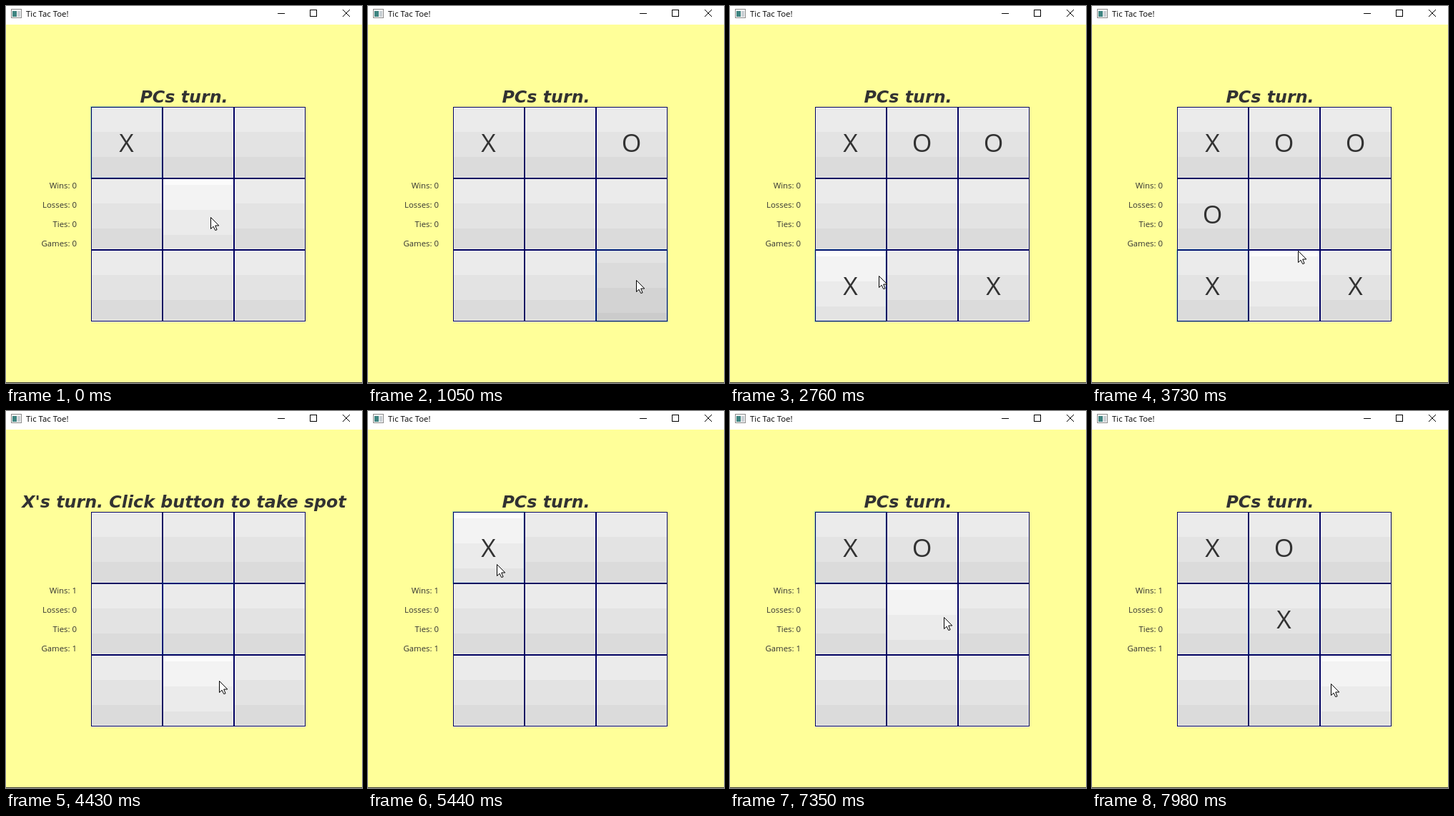
An HTML page with a canvas that plays this animation: 498 px wide and 527 px high, repeating every 8000 ms.

```html
<!DOCTYPE html>
<html lang="en">
<head>
<meta charset="utf-8">
<title>Tic Tac Toe!</title>
<style>
html, body { margin: 0; width: 498px; height: 527px; overflow: hidden; background: #ffff99; }
canvas { display: block; }
</style>
</head>
<body>
<canvas id="stage" width="498" height="527"></canvas>
<script>
const ctx = document.getElementById('stage').getContext('2d');
const LOOP = 8000, STEP = 130;
const CELL = 100, LEFT = 119, TOP = 141;
const INK = '#323232';
const SANS = '"Open Sans", "Noto Sans", sans-serif';

// The player presses a cell, releases one step later; the PC replies after a pause.
const turns = [
  { press: -STEP, cell: 0, reply: 140, pcCell: 2 },
  { press: 1050, cell: 8, reply: 1970, pcCell: 1 },
  { press: 2630, cell: 6, reply: 3730, pcCell: 3 },
  { press: 4160, cell: 4, wins: true },
  { press: 5310, cell: 0, reply: 6530, pcCell: 1 },
  { press: 7610, cell: 4 }
];

// Stops of the pointer: arrival time, place and travel time.
const stops = [
  { at: 0, x: 286, y: 295 },
  { at: 930, x: 375, y: 383 },
  { at: 2500, x: 208, y: 377 },
  { at: 2890, x: 288, y: 342, travel: STEP },
  { at: 4160, x: 288, y: 318, travel: STEP },
  { at: 4420, x: 298, y: 377, travel: STEP },
  { at: 4690, x: 404, y: 460 },
  { at: 5200, x: 180, y: 214 },
  { at: 6150, x: 275, y: 193, travel: 600 },
  { at: 7060, x: 340, y: 270 },
  { at: 7450, x: 271, y: 300 },
  { at: 7930, x: 334, y: 381, travel: STEP }
];

const smooth = p => p * p * (3 - 2 * p);

function pointerAt(time) {
  const t = Math.floor(time / STEP) * STEP;
  const next = stops.findIndex(stop => stop.at > t);
  if (next < 0) return stops[stops.length - 1];
  const from = stops[next - 1], to = stops[next];
  const start = Math.max(from.at, to.at - (to.travel || 400));
  const p = smooth(Math.max(0, (t - start) / (to.at - start)));
  return { x: from.x + (to.x - from.x) * p, y: from.y + (to.y - from.y) * p };
}

// Replays all turns up to the given time.
function gameAt(t) {
  const game = { marks: {}, wins: 0, status: 'PCs turn.' };
  for (const { press, cell, reply, pcCell, wins } of turns) {
    if (t < press) break;
    game.focus = cell;
    game.pressed = t < press + STEP;
    if (game.pressed) break;
    if (wins) {
      game.marks = {};
      game.wins++;
      game.status = "X's turn. Click button to take spot";
      continue;
    }
    game.status = 'PCs turn.';
    game.marks[cell] = 'X';
    if (t >= reply) game.marks[pcCell] = 'O';
  }
  return game;
}

const cellX = i => LEFT + i % 3 * CELL;
const cellY = i => TOP + Math.floor(i / 3) * CELL;
const isOver = (i, p) =>
  p.x >= cellX(i) && p.x < cellX(i) + CELL && p.y >= cellY(i) && p.y < cellY(i) + CELL;

function rect(x, y, w, h, color) {
  ctx.fillStyle = color;
  ctx.fillRect(x, y, w, h);
}

function frame(x, y, w, h, color) {
  ctx.strokeStyle = color;
  ctx.lineWidth = 1;
  ctx.strokeRect(x + 0.5, y + 0.5, w - 1, h - 1);
}

function text(str, x, y, font, align, color = INK) {
  ctx.font = font;
  ctx.textAlign = align;
  ctx.fillStyle = color;
  ctx.fillText(str, x, y);
}

function drawWindow() {
  rect(0, 0, 498, 527, '#ffff99');
  rect(0, 0, 498, 26, '#fff');
  rect(0, 526, 498, 1, '#3a3a3a');

  rect(8, 5, 14, 12, '#f4f4f4');
  frame(7, 4, 15, 13, '#8c8c8c');
  rect(9, 7, 6, 8, '#3f8582');
  rect(16, 7, 4, 8, '#c9d0d4');
  text('Tic Tac Toe!', 28, 15, '11.4px ' + SANS, 'left', '#000');

  rect(380, 10, 10, 1, '#000');
  frame(425, 5, 10, 10, '#000');
  ctx.stroke(new Path2D('M471 5 l10 10 m0 -10 l-10 10'));
}

// Bands get 8 levels darker every 35 px; hover and press shift the gradient.
function drawBands(x, y, hovered, pressed) {
  const shift = pressed ? 52 : hovered ? -44 : 0;
  const first = Math.floor(shift / 35);
  for (let band = first; band * 35 < shift + CELL; band++) {
    const top = Math.max(0, band * 35 - shift);
    const level = Math.min(252, 235 - 8 * band);
    rect(x, y + top, CELL, CELL - top, `rgb(${level},${level},${level})`);
  }
}

function drawCell(i, hovered, pressed, focused) {
  const x = cellX(i), y = cellY(i);
  if (focused) {
    frame(x - 1, y - 1, CELL + 2, CELL + 2, 'rgba(3,158,211,0.3)');
  } else {
    rect(x, y + CELL, CELL, 1, 'rgba(255,255,255,0.75)');
  }
  drawBands(x, y, hovered, pressed);
  frame(x + 1, y + 1, CELL - 2, CELL - 2, 'rgba(255,255,255,0.35)');
  if (focused) frame(x + 1, y + 1, CELL - 2, CELL - 2, 'rgba(3,158,211,0.14)');
  frame(x, y, CELL, CELL, '#000060');
}

function drawPointer({ x, y }) {
  const arrow = new Path2D('M0 0 V16 L3.6 12.7 L6.2 18 L8.6 17.3 L6.2 11.5 H11.3 Z');
  ctx.save();
  ctx.translate(Math.round(x) + 0.5, Math.round(y) + 0.5);
  ctx.fillStyle = '#fff';
  ctx.fill(arrow);
  ctx.strokeStyle = '#000';
  ctx.stroke(arrow);
  ctx.restore();
}

function draw(t) {
  const game = gameAt(t), pointer = pointerAt(t);

  drawWindow();
  text(game.status, 249, 135, 'italic bold 23.75px "DejaVu Sans", sans-serif', 'center');
  ['Wins: ' + game.wins, 'Losses: 0', 'Ties: 0', 'Games: ' + game.wins].forEach((label, i) =>
    text(label, 99, 255 + 27 * i, '11.4px ' + SANS, 'right'));

  for (let i = 0; i < 9; i++) {
    const focused = i === game.focus;
    drawCell(i, isOver(i, pointer), focused && game.pressed, focused);
    if (game.marks[i]) text(game.marks[i], cellX(i) + 49.5, cellY(i) + 62.5, '35.5px ' + SANS, 'center');
  }
  drawPointer(pointer);
}

function tick() {
  draw(performance.now() % LOOP);
  requestAnimationFrame(tick);
}
tick();
</script>
</body>
</html>
```
